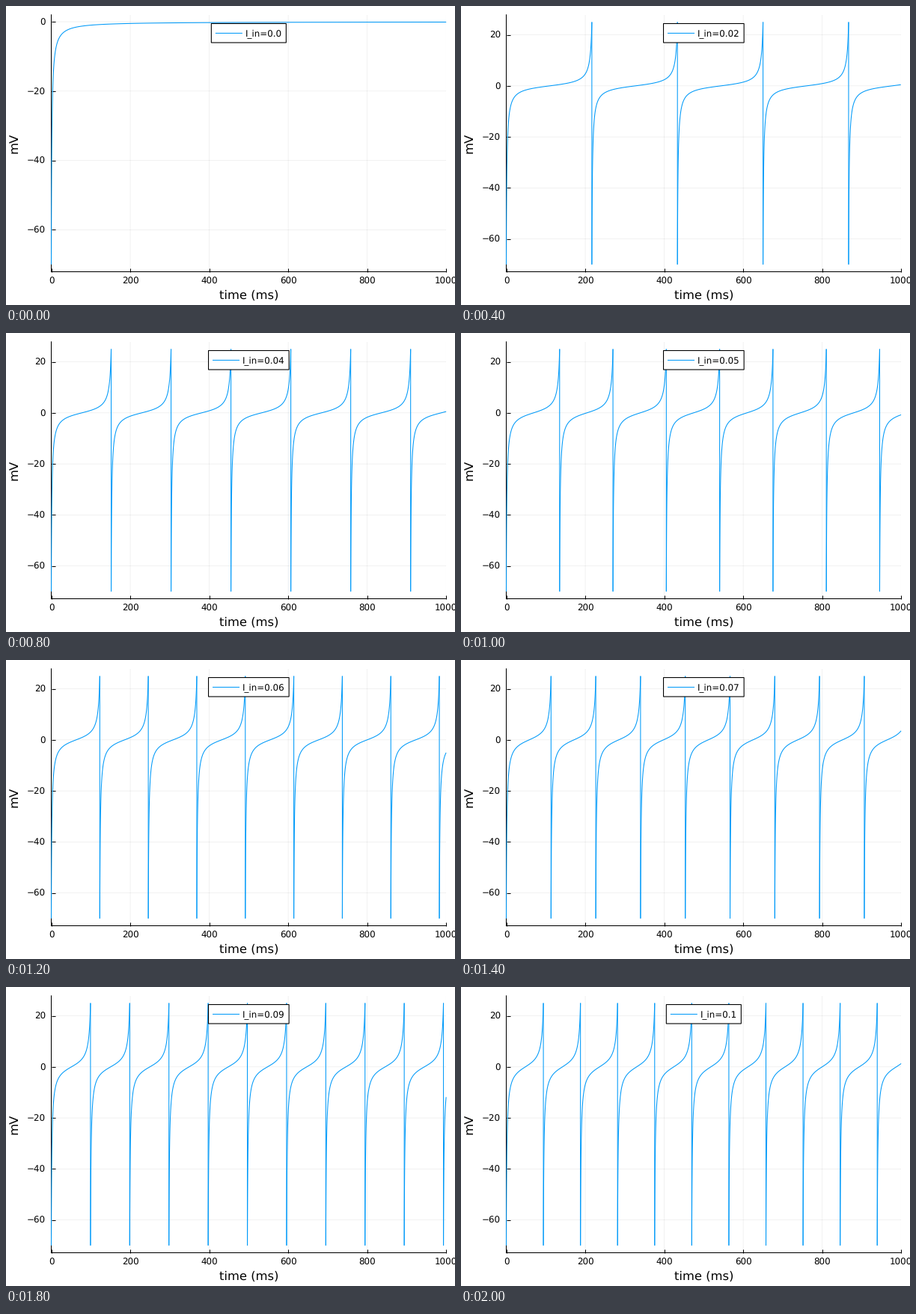
These frames come from a looping animation (600x400 px, 2.2 s). A matplotlib script:

```python
import numpy as np
import matplotlib.pyplot as plt
from matplotlib.animation import FuncAnimation
from matplotlib.patches import Rectangle

W, H, DPI = 600, 400, 100
PX = 72 / DPI                      # points per pixel
LEFT, RIGHT, TOP, BOTTOM = 60.5, 588.2, 11.8, 355.5
MID = (LEFT + RIGHT) / 2
BLUE = "#009AF9"
GAIN, V_RESET, V_PEAK, T_END = 0.01, -70.0, 25.0, 1000.0
SMALL, LARGE = 11.95 * PX, 16.35 * PX

plt.rcParams.update({
    "font.family": "DejaVu Sans",
    "text.hinting": "none",
    "path.simplify": False,
})


def voltage(current):
    """Exact solution of dv/dt = GAIN * v**2 + current with reset at the peak.

    Returns times and voltages (NaN between cycles) and the reset times."""
    if current == 0:
        t = np.concatenate([[0], np.geomspace(0.01, T_END, 1000)])
        return t, 1 / (1 / V_RESET - GAIN * t), np.array([])
    scale, rate = np.sqrt(current / GAIN), np.sqrt(current * GAIN)
    v = np.sinh(np.linspace(np.arcsinh(V_RESET), np.arcsinh(V_PEAK), 500))
    t = (np.arctan(v / scale) - np.arctan(V_RESET / scale)) / rate
    period = t[-1]
    resets = np.arange(period, T_END, period)
    starts = np.append(0, resets)
    times = np.concatenate([np.append(t + s, np.nan) for s in starts])
    volts = np.tile(np.append(v, np.nan), len(starts))
    keep = ~(times > T_END)
    return times[keep], volts[keep], resets


fig = plt.figure(figsize=(W / DPI, H / DPI), dpi=DPI, facecolor="white")
blue_line = dict(color=BLUE, linewidth=1.05 * PX, solid_capstyle="butt",
                 solid_joinstyle="bevel", snap=False, clip_on=False, zorder=3)

# Plot area
ax = fig.add_axes([LEFT / W, 1 - BOTTOM / H, (RIGHT - LEFT) / W, (BOTTOM - TOP) / H])
ax.set_xlim(0, T_END)
ax.set_xticks(range(0, 1001, 200))
ax.set_axisbelow(True)
ax.grid(color="black", alpha=0.1, linewidth=0.55 * PX, snap=False)
ax.tick_params(direction="in", length=4.8 * PX, width=1.05 * PX, labelsize=SMALL)
ax.tick_params(axis="x", pad=7.3 * PX)
ax.tick_params(axis="y", pad=7.6 * PX)
for side in ("top", "right"):
    ax.spines[side].set_visible(False)
for side in ("left", "bottom"):
    ax.spines[side].set(linewidth=1.05 * PX, snap=False)
curve, = ax.plot([], [], **blue_line)
drops, = ax.plot([], [], **blue_line)

# Pixel overlay for axis titles and legend
over = fig.add_axes([0, 0, 1, 1])
over.set(xlim=(0, W), ylim=(H, 0))
over.axis("off")
over.text(MID, 392, "time (ms)", size=LARGE, ha="center", va="baseline")
over.text(15.3, (TOP + BOTTOM) / 2, "mV", size=LARGE, rotation=90,
          rotation_mode="anchor", ha="center", va="baseline")
box = over.add_patch(Rectangle((0, 23.5), 100, 25.5, facecolor="white",
                               edgecolor="black", linewidth=1.1 * PX, snap=False))
key, = over.plot([], [], **blue_line)
label = over.text(0, 40.2, "", size=SMALL, va="baseline", zorder=4)


def update(i):
    current = i / 100
    t, v, resets = voltage(current)
    curve.set_data(t, v)
    drops.set_data(np.repeat(resets, 3),
                   np.tile([V_PEAK, V_RESET, np.nan], len(resets)))
    high = V_PEAK if current else v[-1]
    pad = 0.03 * (high - V_RESET)
    ax.set_ylim(V_RESET - pad, high + pad)
    ax.set_yticks(range(-60, 21 if current else 1, 20))

    text = f"I_in={current}"
    width = 100 + 7.6 * (len(text) - len("I_in=0.0"))
    x = MID - width / 2
    box.set_x(x)
    box.set_width(width)
    key.set_data([x + 5.5, x + 41.5], [36.4, 36.4])
    label.set_text(text)
    label.set_x(x + 45.7)
    return curve, drops, box, key, label


anim = FuncAnimation(fig, update, frames=11, interval=200, repeat=True,
                     repeat_delay=0, blit=False)
plt.show()
```
